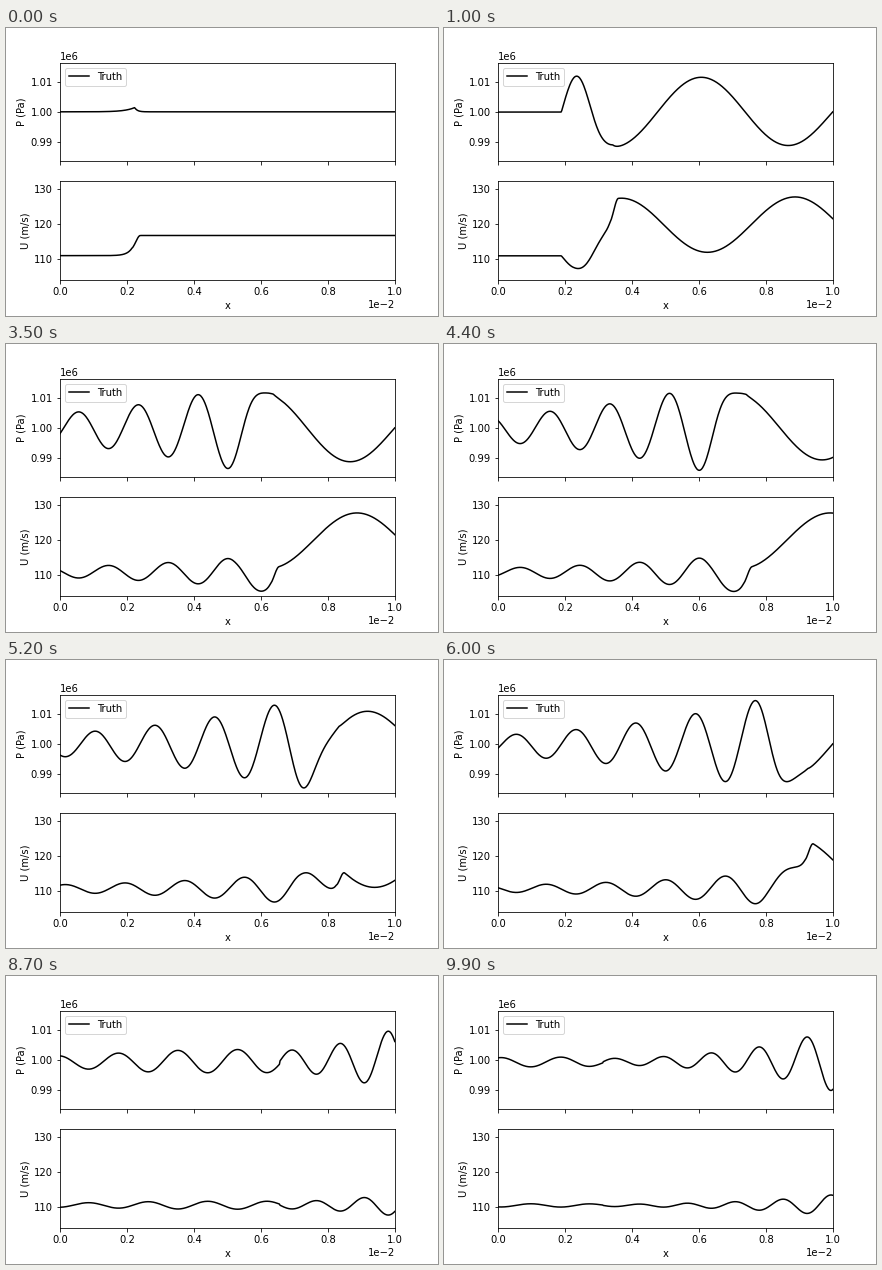
Animation of 432 by 288 pixels, one loop 10000 ms. Source, as a matplotlib script:

```python
import numpy as np
import matplotlib.pyplot as plt
from matplotlib.animation import FuncAnimation

FRAMES, STEP = 100, 100
PERIOD = 5.0          # outlet forcing period, in steps
COLD_PERIOD = 6.24    # Doppler-shifted period ahead of the flame
C_COLD = 0.0286       # upstream wave speed in the fresh gas, per step
K_HOT = 12.0          # wavenumber in the burnt gas
T_EXIT = 75           # step at which the flame has fully left the domain
X = np.linspace(0, 1, 500)


def smooth(s):
    s = np.clip(s, 0, 1)
    return s * s * (3 - 2 * s)


def soft_min(a, b, sharp=15):
    return -np.logaddexp(-sharp * a, -sharp * b) / sharp


def cold_wave(t):
    """Phase (in cycles) and amplitude of the wave in the fresh gas."""
    tau = t - (1 - X) / C_COLD
    cycles = np.maximum(14.96 + (tau - T_EXIT) / COLD_PERIOD, tau / PERIOD)
    cycles = np.where(tau < T_EXIT, 14.96 + (tau - T_EXIT) / COLD_PERIOD, cycles)
    # decay with the distance from where the wave crossed the flame
    entry = np.minimum(0.441 + 0.0083 * tau, 1)
    start = 0.0117 + 0.0083 * entry
    start += (0.0103 - start) * smooth((tau - 60) / 16)
    decay = 2.55 + 1.05 * smooth((tau - 72) / 6)
    return cycles, start * np.exp(-decay * np.maximum(entry - X, 0))


def hot_cycles(t, x):
    return t / PERIOD - K_HOT * (1 - x) / (2 * np.pi)


def fields(t):
    d = X - (0.214 + 0.012 * t - 5e-6 * t * t)   # distance from the flame

    # one continuous wave: short in the fresh gas, long in the burnt gas
    cycles, amp = cold_wave(t)
    if t < T_EXIT:
        cycles = soft_min(cycles, hot_cycles(t, X))
    amp_hot = 0.0115 - 0.0012 * X ** 8
    amp = amp + (amp_hot - amp) * smooth((d + 0.14) / 0.13)
    wave = amp * np.sin(2 * np.pi * np.maximum(cycles, 0))

    # small pressure peak sitting on the flame
    e = d - 0.009
    bump = np.exp(np.where(e < 0, e / 0.03, -e / 0.008))
    drift = -0.0008 * t / 99 * np.sqrt(1 - X)
    p = 1 + wave + (0.0005 + 0.0009 * np.exp(-t / 4)) * bump + drift

    # velocity: fresh and burnt branches joined by the jump at the flame
    near = smooth((d + 0.11) / 0.1)
    u_cold = 110.95 - 0.5 * t / 99 - (295 + 230 * near) * wave
    lift = 3.1 * (1 - smooth((t - 45) / 20)) * smooth(hot_cycles(t, X))
    lagged = np.maximum(hot_cycles(t, X - 0.018), 0)
    u_hot = 116.7 + lift - 7.9 * np.sin(2 * np.pi * lagged)
    jump = np.where(d < 0, 0.35 * np.exp(np.minimum(d, 0) / 0.015),
                    0.35 + 0.65 * smooth((d + 0.002) / 0.028))
    u = u_cold + (u_hot - u_cold) * jump
    return p * 1e6, u


plt.rcParams.update({"font.family": "DejaVu Sans", "font.size": 10})
fig, (ax_p, ax_u) = plt.subplots(2, 1, sharex=True, figsize=(6, 4), dpi=72)
fig.subplots_adjust(left=0.125, right=0.9, bottom=0.125, top=0.88, hspace=0.2)

line_p, = ax_p.plot([], [], "k", lw=1.5, label="Truth")
line_u, = ax_u.plot([], [], "k", lw=1.5)

ax_p.set_ylabel("P (Pa)")
ax_p.set_ylim(0.9836e6, 1.0163e6)
ax_p.set_yticks([0.99e6, 1.00e6, 1.01e6])
ax_p.ticklabel_format(axis="y", style="sci", scilimits=(0, 0), useOffset=False)
ax_p.legend(loc="upper left")

ax_u.set_ylabel("U (m/s)")
ax_u.set_ylim(104.0, 132.2)
ax_u.set_yticks([110, 120, 130])
ax_u.set_xlabel("x")
ax_u.set_xlim(0, 0.01)
ax_u.ticklabel_format(axis="x", style="sci", scilimits=(0, 0))


def update(i):
    p, u = fields(i)
    line_p.set_data(X * 0.01, p)
    line_u.set_data(X * 0.01, u)
    return line_p, line_u


anim = FuncAnimation(fig, update, frames=FRAMES, interval=STEP,
                     repeat=True, repeat_delay=0)
plt.show()
```
